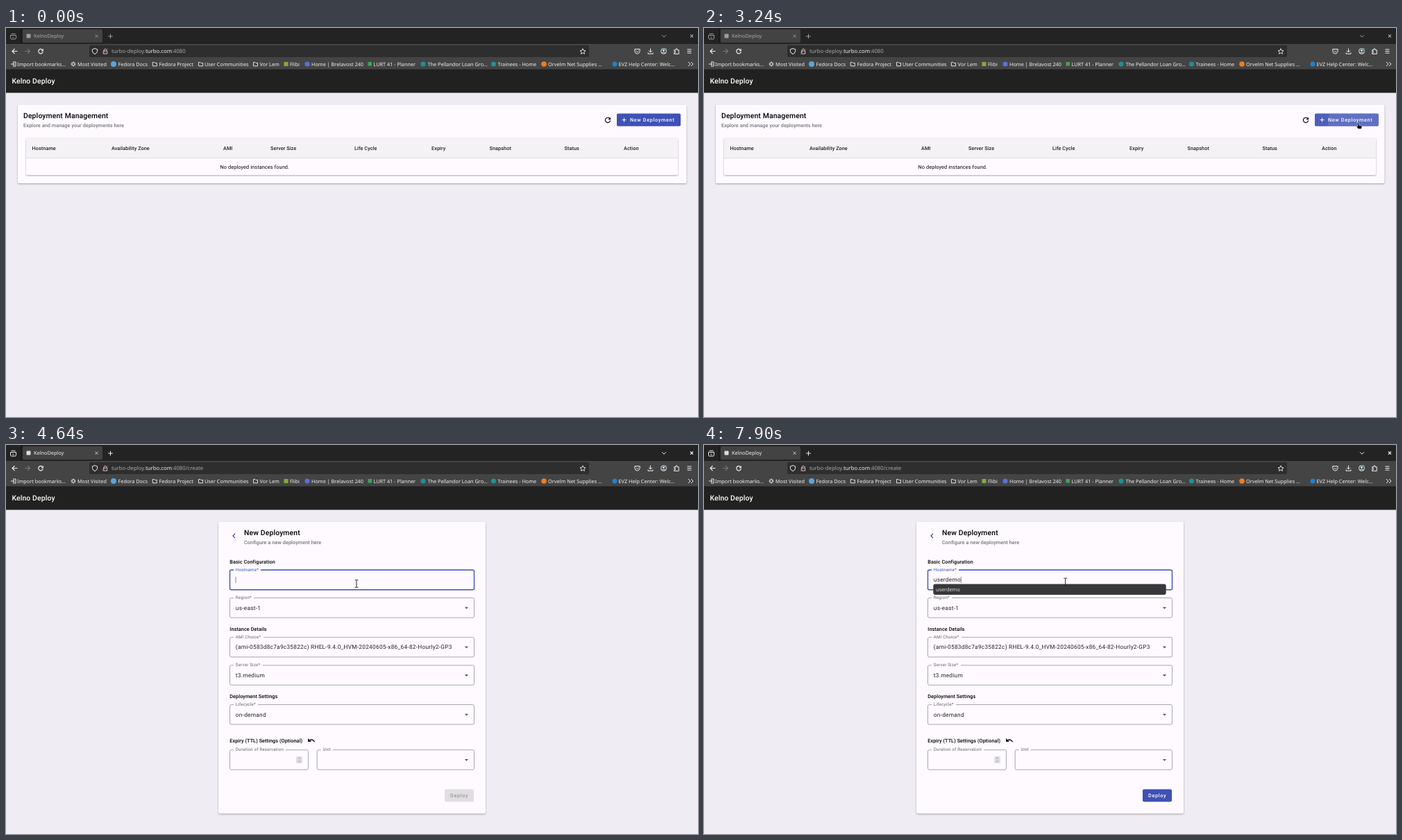
Animation of 997 by 561 pixels, one loop 8 s. Source, as an HTML page:

```html
<!DOCTYPE html>
<html lang="en">
<head>
<meta charset="utf-8">
<title>New deployment</title>
<style>
  html, body { margin: 0; width: 100%; height: 100%; overflow: hidden; background: #efedf3; }
  svg { display: block; }
  text { font-family: Roboto, sans-serif; text-rendering: geometricPrecision; white-space: pre; }
  .ui { font: 7.3px "Noto Sans", sans-serif; fill: #f2f2f2; }
  .url { font: 7.75px "Noto Sans", sans-serif; fill: #a9a9a9; }
  .title { font-size: 10.4px; font-weight: 500; letter-spacing: .0125em; }
  .bold { font-size: 7.27px; font-weight: 500; letter-spacing: .01em; }
  .body { font-size: 7.27px; letter-spacing: .0178em; }
  .button { font-size: 7.27px; font-weight: 500; letter-spacing: .089em; }
  .value { font-size: 8.31px; letter-spacing: .03125em; fill: #222; }
  .label { font-size: 6.23px; letter-spacing: .03125em; fill: #666; }
  .muted { fill: #77757a; }
  .card { fill: #fefaff; filter: drop-shadow(0 1px .8px #0005); }
</style>
</head>
<body>
<svg id="stage" width="997" height="561" viewBox="0 0 997 561"></svg>
<script>
const LOOP = 8000;
const BLUE = '#3f51b5', PAPER = '#fefaff', LIGHT = '#f0f0f0';

const text = (x, y, cls, str, extra = '') => `<text x="${x}" y="${y}" class="${cls}" ${extra}>${str}</text>`;
const rect = (x, y, w, h, fill, r = 0, extra = '') =>
  `<rect x="${x}" y="${y}" width="${w}" height="${h}" rx="${r}" fill="${fill}" ${extra}/>`;
const dot = (x, y, r, fill) => `<circle cx="${x}" cy="${y}" r="${r}" fill="${fill}"/>`;
const ring = (x, y, r, color = LIGHT) =>
  `<circle cx="${x}" cy="${y}" r="${r}" fill="none" stroke="${color}"/>`;
const line = (x, y, d, color = LIGHT, width = 1) =>
  `<path transform="translate(${x} ${y})" d="${d}" fill="none" stroke="${color}" stroke-width="${width}"/>`;
const shape = (x, y, d, fill) => `<path transform="translate(${x} ${y})" d="${d}" fill="${fill}"/>`;
const group = (id, content) => `<g id="${id}">${content}</g>`;
const reload = (x, y, r, color) =>
  line(x, y, `M${r * .7} ${-r * .7}A${r} ${r} 0 1 0 ${r} ${r * .2}`, color, 1.2) +
  shape(x, y, `M${r * 1.15} ${-r * 1.15}V${-r * .1}H${r * .1}Z`, color);

// Browser window
const folder = x => line(x, 52, 'M-3 -2.5H-.5L.5 -1.5H3V2.8H-3Z', LIGHT, .9);
const bookmarks = [
  [16, 'Import bookmarks…', line(11, 52, 'M-1 -3H3V3H-1M-4 0H1M-1 -2L1 0L-1 2')],
  [103, 'Most Visited', ring(97, 52, 2.1) + line(97, 52, 'M0 -3.6V-2M0 2V3.6M-3.6 0H-2M2 0H3.6M-2.5 -2.5L-1.5 -1.5M2.5 2.5L1.5 1.5M-2.5 2.5L-1.5 1.5M2.5 -2.5L1.5 -1.5')],
  [161.5, 'Fedora Docs', dot(155, 52, 4, '#5aa5dc')],
  [220.5, 'Fedora Project', folder(214.3)],
  [286, 'User Communities', folder(280.5)],
  [365.5, 'Vor Lem', folder(359.5)],
  [409, 'Flibi', rect(400.5, 49, 6, 6, '#86a93c')],
  [440, 'Home | Brelavost 240', dot(434, 52, 3.6, '#5b6fd6')],
  [529.5, 'LURT 41 - Planner', rect(521.5, 49, 5.5, 5.5, '#3fa35c')],
  [607.5, 'The Pellandor Loan Gro…', dot(601, 52, 3.6, '#1f8f98')],
  [708.5, 'Trainees - Home', dot(702.5, 52, 3.6, '#1f8f98')],
  [781, 'Orvelm Net Supplies …', dot(775, 52, 3.8, '#ee7d22')],
  [882.5, 'EVZ Help Center: Welc…', dot(877, 52, 3.5, '#1e83cc')],
].map(([x, label, icon]) => icon + text(x, 54.6, 'ui', label)).join('');

const browser =
  rect(0, 0, 997, 60, '#444') + rect(0, 0, 997, 23, '#232323') + rect(24, 2, 115, 19, '#434343', 2) +
  rect(21.5, 0, .8, 23, '#111') +
  group('titleBar',
    line(10.5, 12, 'M-4 -1.5H4V2.5Q4 4 2.5 4H-2.5Q-4 4 -4 2.5ZM-3 -3.7H3M-1.3 1L0 2L1.3 1') +
    rect(29.5, 8.5, 6, 6, '#ddd', 1) + text(40, 14.2, 'ui', 'KelnoDeploy') +
    line(130.5, 11.7, 'M-2 -2L2 2M2 -2L-2 2', LIGHT, .8) +
    line(150.5, 12, 'M-3.3 0H3.3M0 -3.3V3.3') +
    line(948, 11.5, 'M-3 -1.3L0 1.7L3 -1.3') + line(988, 11.5, 'M-2 -2L2 2M2 -2L-2 2', LIGHT, 1.1)) +
  rect(120, 25, 720, 17, '#2e2e2e', 2) +
  line(12.5, 33.5, 'M4 0H-3.5M0 -3.5L-3.5 0L0 3.5', LIGHT, 1.1) +
  line(31, 33.5, 'M-4 0H3.5M0 -3.5L3.5 0L0 3.5', '#777', 1.1) +
  reload(50, 33.5, 3.3, LIGHT) +
  line(128, 33.5, 'M0 -4L3.6 -2.7V0Q3 3 0 4.2Q-3 3 -3.6 0V-2.7Z') +
  line(143, 33.5, 'M-2.7 -.5H2.7V3.6H-2.7ZM-1.8 -.5V-2.2Q0 -5 1.8 -2.2V-.5', '#ccc') +
  line(143, 33.5, 'M-3.7 3.7L3.7 -3.5', '#e0566f') +
  `<text x="152" y="36.3" class="url">turbo-deploy.<tspan fill="#f4f4f4">turbo.com</tspan>:4080<tspan id="path">/create</tspan></text>` +
  line(831, 33.7, 'M0 -4L1.2 -1.3L4 -1L1.9 .9L2.5 3.7L0 2.2L-2.5 3.7L-1.9 .9L-4 -1L-1.2 -1.3Z', LIGHT, .9) +
  line(909.5, 33.5, 'M-3.7 -3H3.7V0Q3 3.5 0 3.7Q-3 3.5 -3.7 0ZM-2 -.8L0 1.1L2 -.8') +
  line(928.5, 33.5, 'M0 -4V1.5M-2.5 -1L0 1.5L2.5 -1M-3.5 2V3.7H3.5V2') +
  ring(947.5, 33.5, 3.9) + dot(947.5, 32.4, 1.4, LIGHT) + line(947.5, 35.6, 'M-2.3 .6Q0 -1.7 2.3 .6') +
  dot(950.5, 30.5, 1.3, '#35b7e8') +
  line(966, 33.7, 'M-3.3 -2H-1V-3.7H1V-2H3.3V3.7H-3.3V1.7H-1.7V0H-3.3Z') +
  line(984.5, 33.5, 'M-3 -2.6H3M-3 0H3M-3 2.6H3') +
  bookmarks + line(986, 52, 'M-3 -3L0 0L-3 3M1 -3L4 0L1 3') +
  rect(0, 59.5, 997, 34, '#212121') + text(8.4, 80.4, 'title', 'Kelno Deploy', 'fill="#fff"');

// Deployment list
const columns = [[37.5, 'Hostname'], [152, 'Availability Zone'], [313, 'AMI'], [381, 'Server Size'],
  [502, 'Life Cycle'], [613, 'Expiry'], [696.5, 'Snapshot'], [804.5, 'Status'], [890, 'Action']];

const home =
  rect(17, 110.5, 963.5, 113.5, PAPER, 2, 'class="card"') +
  text(25, 130.4, 'title', 'Deployment Management') +
  text(25, 143.4, 'bold muted', 'Explore and manage your deployments here') +
  reload(867, 132.7, 3.6, '#111') +
  rect(880, 123.5, 92, 18, BLUE, 2, 'style="filter:drop-shadow(0 .8px .6px #0005)"') +
  '<clipPath id="buttonClip"><rect x="880" y="123.5" width="92" height="18" rx="2"/></clipPath>' +
  rect(880, 123.5, 92, 18, '#fff', 2, 'id="hover"') +
  '<circle id="ripple" cx="943" cy="137" fill="#fff" clip-path="url(#buttonClip)"/>' +
  line(890.5, 132.5, 'M-3 0H3M0 -3V3', '#fff') +
  text(899, 135.1, 'button', 'New Deployment', 'fill="#fff"') +
  rect(29, 158.5, 939, 53.5, PAPER, 2, 'class="card"') +
  rect(29, 158.5, 939, 29, '#f4f2f5') + rect(29, 187, 939, .8, '#d8d6da') +
  columns.map(([x, name]) => text(x, 175.6, 'bold', name, 'fill="#222"')).join('') +
  text(308.5, 202.6, 'body', 'No deployed instances found.');

// Deployment form
function field(id, x, y, width, label, notch, value = '', arrow = true) {
  const right = x + width, bottom = y + 28.5;
  return `<g id="${id}"><path class="outline" fill="none" d="M${x + 5.5} ${y}H${x + 2}Q${x} ${y} ${x} ${y + 2}` +
    `V${bottom - 2}Q${x} ${bottom} ${x + 2} ${bottom}H${right - 2}Q${right} ${bottom} ${right} ${bottom - 2}` +
    `V${y + 2}Q${right} ${y} ${right - 2} ${y}H${x + 8.5 + notch + 2}"/>` +
    text(x + 8.3, y + 1.7, 'label', label) + text(x + 8.3, y + 17, 'value', value) +
    (arrow ? shape(right - 11, y + 13.3, 'M-2.6 0H2.6L0 2.7Z', '#555') : '') + '</g>';
}

const form =
  rect(306, 110.5, 385, 421, PAPER, 2, 'id="formCard" class="card"') +
  line(328.5, 131, 'M1.4 -3L-1.5 0L1.4 3', '#2f3fae', 1.1) +
  text(343, 130.4, 'title', 'New Deployment') +
  text(343, 143.4, 'bold muted', 'Configure a new deployment here') +
  text(322.3, 170.8, 'bold', 'Basic Configuration') +
  field('hostname', 322.5, 180.3, 352, 'Hostname*', 34, '', false) +
  field('region', 322.5, 220.5, 352, 'Region*', 24, 'us-east-1') +
  text(322.3, 268, 'bold', 'Instance Details') +
  field('ami', 322.5, 277.3, 352, 'AMI Choice*', 38,
    '(ami-0583d8c7a9c35822c) RHEL-9.4.0_HVM-20240605-x86_64-82-Hourly2-GP3') +
  field('size', 322.5, 317.7, 352, 'Server Size*', 37, 't3.medium') +
  text(322.3, 365, 'bold', 'Deployment Settings') +
  field('lifecycle', 322.5, 374.5, 352, 'Lifecycle*', 30, 'on-demand') +
  text(322.3, 429, 'bold', 'Expiry (TTL) Settings (Optional)') +
  shape(440, 426.5, 'M-5 -3.5V1.5H0L-1.8 -.4Q2 -2 4 2L5.2 1.5Q2.5 -4 -3 -1.6Z', '#111') +
  field('duration', 322.5, 439.7, 113, 'Duration of Reservation', 70, '', false) +
  rect(418, 449, 9, 10, '#e2e0e4', 1) +
  line(422.5, 454, 'M-1.8 -1.3L0 -3L1.8 -1.3M-1.8 1.3L0 3L1.8 1.3', '#777', .8) +
  field('unit', 448.2, 439.7, 226.3, 'Unit', 12) +
  group('deployRow',
    rect(632, 496.5, 42, 18, '#e0dee1', 2) + text(640, 508, 'button', 'Deploy', 'fill="#9b999c"') +
    group('deployOn', rect(632, 496.5, 42, 18, BLUE, 2) + text(640, 508, 'button', 'Deploy', 'fill="#fff"'))) +
  rect(0, 190, .7, 9, '#555', 0, 'id="caret"') +
  group('popup', rect(330.3, 200.5, 335.4, 15.5, '#38383a', 3, 'id="popupBox"') +
    [0, 1, 2, 3].map(i => text(334, 211.2 + i * 10.4, 'ui', '', 'style="fill:#dedede"')).join(''));

const cursors = group('arrow',
    '<path d="M0 0V9.3L2.1 7.4L3.6 10.4L5 9.7L3.6 6.8H6.4Z" fill="#111" stroke="#fff" stroke-width=".6"/>') +
  group('hand',
    '<path d="M-1 .5Q0 -1 1 .5V3.2L4.6 4Q5.5 4.3 5.2 5.6L4.4 8.5H-.3L-2.7 5.3Q-2.6 4 -1 5Z" fill="#111" stroke="#fff" stroke-width=".5"/>') +
  group('beam',
    '<path d="M-2.4 -5.3H-.8L0 -4.7L.8 -5.3H2.4M0 -4.7V4.7M-2.4 5.3H-.8L0 4.7L.8 5.3H2.4" fill="none" stroke="#222" stroke-width="1"/>');

const stage = document.getElementById('stage');
stage.innerHTML = rect(0, 0, 997, 561, '#efedf3') + group('home', home) + group('form', form) +
  browser + group('cursor', cursors);

const $ = id => document.getElementById(id);
const set = (id, name, value) => $(id).setAttribute(name, value);
const show = (id, on) => set(id, 'display', on ? 'inline' : 'none');
const clamp = v => Math.min(1, Math.max(0, v));
const outline = (id, color, width) => {
  const path = $(id).querySelector('.outline');
  path.setAttribute('stroke', color);
  path.setAttribute('stroke-width', width);
};
['ami', 'size', 'lifecycle', 'duration', 'unit'].forEach(id => outline(id, '#a09ea2', .9));

const mousePath = [[1940, 996, 288], [2440, 931, 218], [2740, 940, 153], [3000, 942.7, 137],
  [3370, 942.7, 137], [4000, 557, 218.7], [4400, 505, 200], [7899, 505, 200], [7900, 520.7, 197.4]];
const keyTimes = [5670, 5900, 6240, 6440, 6670, 6840, 7000, 7170];
const suggestions = ['userdata', 'userdemo', 'userdatatest', 'alma9usertest'];

function mouseAt(t) {
  const next = mousePath.findIndex(p => p[0] > t);
  if (next < 1) return mousePath.at(next).slice(1);
  const [t0, x0, y0] = mousePath[next - 1], [t1, x1, y1] = mousePath[next];
  let k = (t - t0) / (t1 - t0);
  if (t > 3000) k = k * k * (3 - 2 * k);
  return [x0 + (x1 - x0) * k, y0 + (y1 - y0) * k];
}

function draw(t) {
  const onForm = t >= 3900, loaded = t >= 4000, focused = t >= 4500;
  const [x, y] = mouseAt(t);

  show('home', !onForm);
  show('form', onForm);
  show('path', loaded);
  show('deployRow', loaded);
  set('formCard', 'height', loaded ? 421 : 365);
  set('titleBar', 'opacity', t < 3300 ? .6 : 1);

  const overButton = !onForm && t > 2740 && x > 880 && y < 141.5 && y > 123;
  const press = clamp((t - 3170) / 225);
  set('hover', 'opacity', overButton ? .08 : 0);
  set('ripple', 'r', 65 * (1 - (1 - press) ** 3));
  set('ripple', 'opacity', .1 * (1 - clamp((t - 3400) / 150)));

  const overHost = onForm && y < 209, overRegion = onForm && y > 217;
  outline('region', overRegion ? '#333' : '#a09ea2', .9);
  outline('hostname', focused ? BLUE : overHost ? '#333' : '#a09ea2', focused ? 1.4 : .9);
  $('hostname').querySelector('.label').style.fill = focused ? BLUE : '';

  const typed = 'userdemo'.slice(0, keyTimes.filter(k => t >= k).length);
  const value = $('hostname').querySelector('.value');
  value.textContent = typed;
  show('caret', focused);
  set('caret', 'x', 330.7 + (typed && onForm ? value.getComputedTextLength() : 0));
  set('deployOn', 'opacity', clamp((t - 5900) / 150));

  const matches = suggestions.filter(s => s.includes(typed));
  show('popup', t >= 5970);
  set('popupBox', 'height', 5.1 + 10.4 * matches.length);
  $('popup').querySelectorAll('text').forEach((row, i) => row.textContent = matches[i] || '');

  show('cursor', t >= 1940 && t < 5900 || t >= 7900);
  set('cursor', 'transform', `translate(${x} ${y})`);
  show('hand', overButton);
  show('beam', overHost);
  show('arrow', !overButton && !overHost);
}

function tick() {
  draw(performance.now() % LOOP);
  requestAnimationFrame(tick);
}
tick();
</script>
</body>
</html>
```
